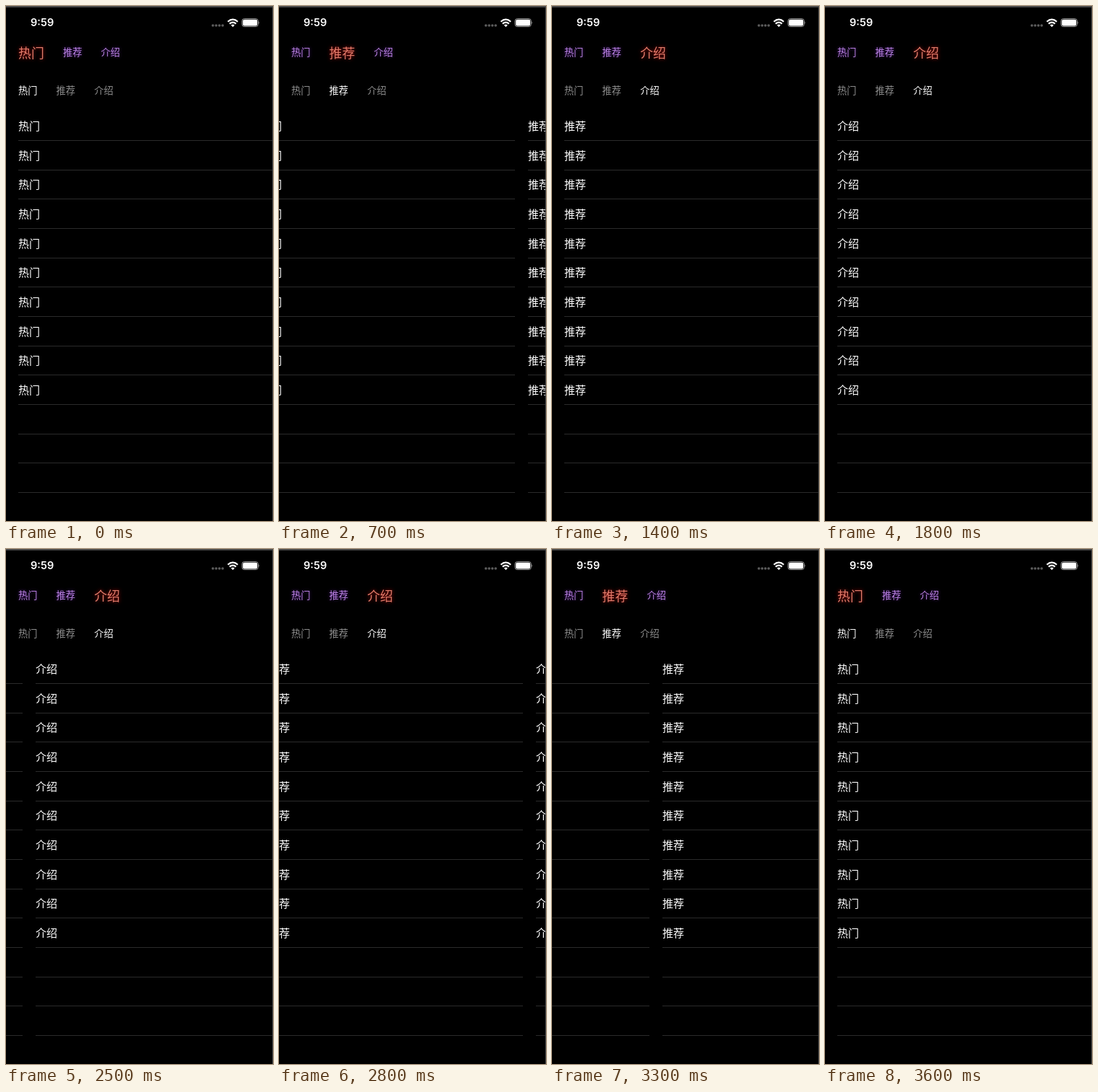
Recreate the animation shown at these times as an HTML page. Size 370 by 714 pixels, loop 3700 ms.

```html
<!DOCTYPE html>
<html lang="zh-CN">
<head>
<meta charset="utf-8">
<title>Tabs</title>
<style>
  html, body { margin: 0; width: 100%; height: 100%; overflow: hidden; background: #000; }
  body { font-family: "Noto Sans CJK SC", "Noto Sans CJK", "Noto Sans CJK JP", sans-serif; }
  #stage { position: relative; width: 370px; height: 714px; overflow: hidden; background: #000; }
  #edge-top { position: absolute; left: 0; top: 0; width: 370px; height: 2px; background: #484848; }
  #edge-right { position: absolute; left: 369px; top: 0; width: 1px; height: 714px; background: #484848; }
  #clock {
    position: absolute; left: 34px; top: 13px;
    font: 600 14.6px/20px Inter, "Liberation Sans", sans-serif; color: #fff;
  }
  #icons { position: absolute; left: 0; top: 0; }
  .tabs {
    position: absolute; left: 17px; height: 30px; display: flex; gap: 26.1px;
    align-items: center; font-size: 13.25px; line-height: 30px; white-space: nowrap;
  }
  #glow { top: 49px; }
  #plain { top: 102px; font-weight: 500; }
  #pager { position: absolute; left: 0; top: 146px; will-change: transform; }
  .page { position: absolute; top: 0; width: 353px; }
  .row {
    position: absolute; left: 0; width: 353px; height: 40px;
    font-size: 15.1px; font-weight: 500; line-height: 39px; color: #fff;
  }
  .row::after {
    content: ""; position: absolute; left: 0; top: 40px;
    width: 100%; height: 1px; background: #2b2b2b;
  }
</style>
</head>
<body>
<div id="stage">
  <div id="pager"></div>
  <div id="glow" class="tabs"></div>
  <div id="plain" class="tabs"></div>
  <div id="clock">9:59</div>
  <svg id="icons" width="370" height="40" fill="#fff">
    <g fill="#5c5c5c">
      <circle cx="286.7" cy="27" r="1.8"/><circle cx="291.2" cy="27" r="1.8"/>
      <circle cx="295.7" cy="27" r="1.8"/><circle cx="300.2" cy="27" r="1.8"/>
    </g>
    <g fill="none" stroke="#fff" stroke-width="2.2">
      <path d="M307.4 21.8q6.9-6.2 13.8 0"/>
      <path d="M309.8 24.6q4.5-4 9 0"/>
    </g>
    <path d="M314.3 29.2l-2.5-2.6q2.5-2.1 5 0z"/>
    <rect x="327" y="17.6" width="22.4" height="11" rx="3.2" fill="none" stroke="#999"/>
    <rect x="328.2" y="18.8" width="20" height="8.6" rx="2"/>
    <path d="M350.5 21.2q1.7 1.9 0 3.8z" fill="#999"/>
  </svg>
  <div id="edge-top"></div>
  <div id="edge-right"></div>
</div>
<script>
const LOOP = 3700, PAGE = 371, PITCH = 40.65;
const NAMES = ['热门', '推荐', '介绍'];
const byId = id => document.getElementById(id);

function add(parent, cls, text = '') {
  const el = document.createElement('div');
  el.className = cls;
  el.textContent = text;
  parent.append(el);
  return el;
}

// Each step is [time in ms, value]; the value holds until the next step.
function hold(el, steps, style) {
  const last = steps[steps.length - 1];
  const frames = [...steps, [LOOP, last[1]]].map(([ms, value]) =>
    ({ offset: ms / LOOP, easing: 'step-end', ...style(value) }));
  el.animate(frames, { duration: LOOP, iterations: Infinity });
}

const selected = [[0, 0], [600, 1], [1400, 2], [3000, 1], [3600, 0]];

const scroll = [
  [0, 0],
  [700, 43], [800, 195], [900, 325], [1000, 364], [1100, PAGE],
  [1500, 464], [1600, 640], [1700, 730], [1800, 2 * PAGE],
  [2500, 718], [2600, 622], [2700, 478], [2800, 403], [2900, 377], [3000, PAGE],
  [3200, 340], [3300, 235], [3400, 95], [3500, 14], [3600, 0]
];

const glowStyle = on => on
  ? { fontSize: '17.9px', color: '#e07b6a', textShadow: '0 0 5px rgba(220, 0, 0, .75)' }
  : { fontSize: '13.25px', color: '#b982e0', textShadow: '0 0 4px rgba(100, 30, 170, .7)' };
const plainStyle = on => ({ color: on ? '#fff' : '#8e8e8e' });

NAMES.forEach((name, i) => {
  hold(add(byId('glow'), 'tab', name), selected, v => glowStyle(v === i));
  hold(add(byId('plain'), 'tab', name), selected, v => plainStyle(v === i));

  const page = add(byId('pager'), 'page');
  page.style.left = 17 + i * PAGE + 'px';
  for (let r = 0; r < 13; r++) {
    add(page, 'row', r < 10 ? name : '').style.top = Math.round(r * PITCH) + 'px';
  }
});

hold(byId('pager'), scroll, x => ({ transform: `translateX(${-x}px)` }));
</script>
</body>
</html>
```
